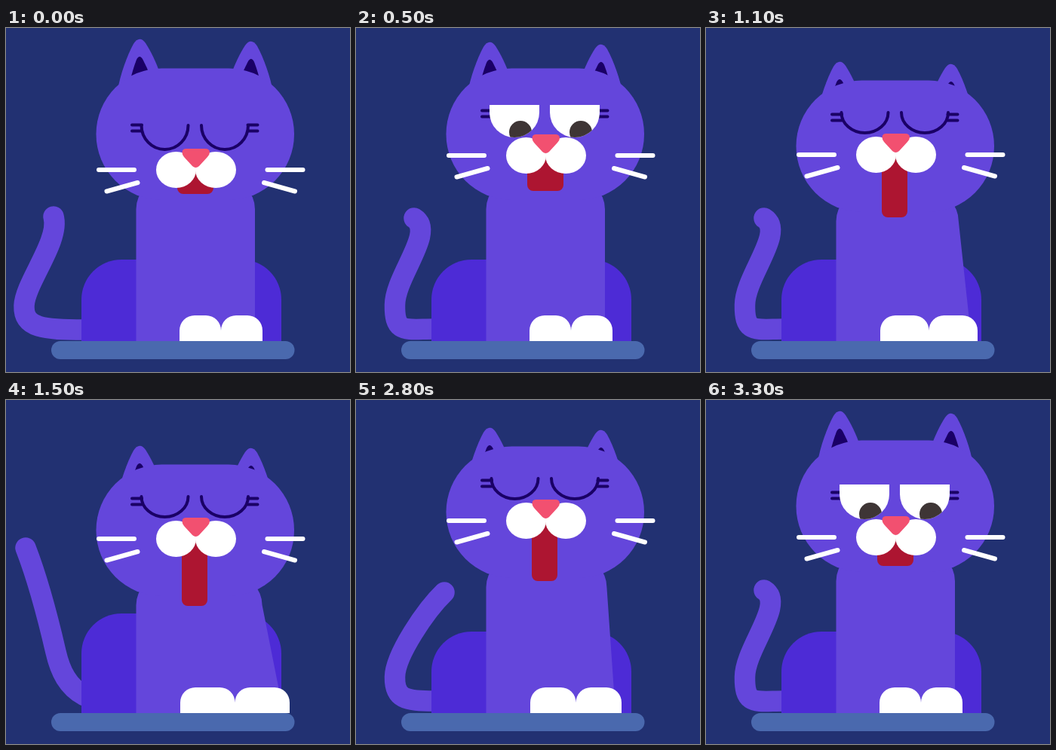
Animation of 456x456 px, one loop 3.4 s. Source, as an HTML page:

```html
<!DOCTYPE html>
<html lang="en">
<head>
<meta charset="utf-8">
<title>Yawning cat</title>
<style>
  html, body { margin: 0; height: 100%; overflow: hidden; background: #223172; }
  svg { display: block; width: 100vw; height: 100vh; }
  .fur { fill: #6446db; }
  .dark { fill: #1a0066; }
  .white { fill: #fff; }
  .line { fill: none; stroke: #1a0066; stroke-width: 4; stroke-linecap: round; }
  .whisker { fill: none; stroke: #fff; stroke-width: 6; stroke-linecap: round; }
  #tail { fill: none; stroke: #6446db; stroke-width: 27.5; stroke-linecap: round; }
</style>
</head>
<body>
<svg viewBox="0 0 456 456">
  <defs>
    <clipPath id="eyeClip"><path id="eyeEdge"/></clipPath>
    <g id="openEye" clip-path="url(#eyeClip)">
      <rect class="white" x="170" y="100" width="80" height="70"/>
      <circle cx="218" cy="157" r="15" fill="#3e3535"/>
    </g>
    <path id="closedEye" class="line"/>
    <path id="lash" class="line" d="M167 128.500H180M167 136.500H180"/>
    <path id="whiskers" class="whisker" d="M123 188H170M133.500 216.500L174.500 205"/>
    <g id="ear">
      <path class="fur" d="M148 82C152 60 160 38 169 21Q177 9 185 20C192 31 199 45 204 60V90H148Z"/>
      <path class="dark" d="M164 72Q168 55 173 42Q177 34 181.500 42Q187 52 191 64Z"/>
    </g>
  </defs>

  <rect width="456" height="456" fill="#223172"/>
  <path id="tail"/>
  <path id="haunch" fill="#4d2bd6"/>
  <path id="chest" class="fur"/>
  <path id="paws" class="white"/>
  <rect x="60" y="415" width="322.500" height="24" rx="12" fill="#4a69ae"/>

  <g id="head">
    <g id="ears">
      <use href="#ear"/>
      <use href="#ear" transform="translate(502 3) scale(-1 1)"/>
    </g>
    <rect class="fur" x="119.500" y="53.500" width="262.500" height="174.500" rx="87"/>
    <g id="face">
      <g id="lashes">
        <use href="#lash"/>
        <use href="#lash" transform="translate(500.500) scale(-1 1)"/>
      </g>
      <g id="open"><use href="#openEye"/><use href="#openEye" x="80"/></g>
      <g id="closed"><use href="#closedEye"/><use href="#closedEye" x="79.500"/></g>
      <rect id="mouth" y="186" rx="8" fill="#ad1531"/>
      <ellipse class="white" cx="225.500" cy="188" rx="26.500" ry="24"/>
      <ellipse class="white" cx="278" cy="188" rx="27" ry="24"/>
      <path fill="#f25070" d="M239 160H264Q270 160 270 165Q270 168 267 171L256 183Q251.500 187 247 183L236 171Q233.500 168 233.500 165Q233.500 160 239 160Z"/>
      <use href="#whiskers"/>
      <use href="#whiskers" transform="translate(516.500) scale(-1 1)"/>
    </g>
  </g>
</svg>
<script>
const LOOP = 3400;
const $ = id => document.getElementById(id);

// Each step holds one moment of the yawn; the way back replays it in reverse.
const steps = [
  ...[0, 100, 200, 300, 400, 500, 600, 700, 800, 900, 1100, 1300, 1500].map(t => [t, t]),
  [2500, 1300], [2700, 1100], [2800, 900], [2900, 800],
  [3000, 700], [3100, 600], [3200, 500], [3300, 400]
];

// moment: head drop, face shift, ear drop, mouth opening, lid height, lid sag, lash drop
const poseKeys = [
  [0,    0, 0, 0, 0, 118, 0, 0],
  [300,  0, 0, 0, 0, 118, 0, 0],
  [400,  0, -6, 0, 6, 118, 0, 0],
  [600,  0, -32, 8, 24, 124, 0, 0],
  [800,  0, -32, 12, 40, 130, 16, 6],
  [900,  8, -36, 14, 48, 130, 16, 6],
  [1500, 32, -36, 14, 57, 130, 16, 6]
];

// Tail curves: tip, two handles, bend, handle, base
const tails = {
  left:  [63, 250, 72, 282, 25, 338, 24, 368, 50, 400, 104, 400],
  curl:  [55.5, 257, 96, 262, 40, 330, 40, 367, 60, 399, 104, 399],
  rest:  [77, 252, 106, 270, 52, 328, 51.5, 367, 65, 399, 104, 399],
  right: [117, 255, 93, 278, 52, 338, 51.5, 367, 65, 399, 104, 399],
  wave:  [46, 218, 84, 268, 58, 325, 57.5, 355, 65, 388, 104, 397],
  high:  [26, 196, 45, 245, 60, 308, 66, 334, 82, 380, 104, 392]
};
const tailKeys = [
  [0, 'left'], [300, 'curl'], [400, 'rest'], [600, 'rest'], [800, 'right'],
  [900, 'right'], [1100, 'rest'], [1300, 'wave'], [1500, 'high']
].map(([t, name]) => [t, ...tails[name]]);

function sample(keys, t) {
  const i = Math.max(1, keys.findIndex(k => k[0] >= t));
  const [a, b] = [keys[i - 1], keys[i]];
  const u = (t - a[0]) / (b[0] - a[0]);
  return a.slice(1).map((v, j) => v + (b[j + 1] - v) * u);
}

const setPath = (id, d) => $(id).setAttribute('d', d);
const shift = (id, y) => $(id).setAttribute('transform', `translate(0 ${y})`);
const show = (id, on) => $(id).setAttribute('display', on ? 'inline' : 'none');

function drawBody(drop) {
  const top = 307 - Math.max(0, (drop - 16) * 1.5);
  setPath('haunch', `M100 415V${top + 53}a53 53 0 0 1 53 -53H312a53 53 0 0 1 53 53V415Z`);

  const lean = drop ? drop + 6 : 0;
  const shoulder = 330 + drop * 0.3;
  setPath('chest', `M172.500 415V${240 + drop}a40 40 0 0 1 40 -40H${shoulder - 40}` +
    `a40 40 0 0 1 40 40L${330 + lean} 415Z`);

  const left = drop ? 231 : 230;
  const right = 340 + (drop ? drop + 4 : 0);
  const paw = (right - left) / 2;
  const pawPath = x => `M${x} 415V401a20 20 0 0 1 20 -20h${paw - 40}a20 20 0 0 1 20 20V415Z`;
  setPath('paws', pawPath(left) + pawPath(left + paw));
}

function drawFace(t, opening, lid, sag, lash) {
  const closed = t < 200 || t >= 900;
  show('open', !closed);
  show('closed', closed);
  setPath('eyeEdge', `M177 ${lid}V131A33 33 0 0 0 243 131V${lid}Q210 ${lid + 2 * sag} 177 ${lid}Z`);
  const end = 129 + lash / 2;
  setPath('closedEye', `M179.500 ${end}A31 ${32 - lash * 5 / 6} 0 0 0 241.500 ${end}`);
  shift('lashes', lash);

  const width = t >= 900 ? 34 : 48;
  $('mouth').setAttribute('x', (t >= 900 ? 250 : 251) - width / 2);
  $('mouth').setAttribute('width', width);
  $('mouth').setAttribute('height', 34 + opening);
}

function draw(t) {
  const [drop, face, ear, opening, lid, sag, lash] = sample(poseKeys, t);
  shift('head', drop);
  shift('face', face);
  shift('ears', ear);
  drawBody(drop);
  drawFace(t, opening, lid, sag, lash);
  const p = sample(tailKeys, t);
  setPath('tail', `M${p.slice(0, 2)}C${p.slice(2, 8)}S${p.slice(8)}`);
}

const start = performance.now();
function tick() {
  const now = (performance.now() - start) % LOOP;
  draw(steps.findLast(([from]) => from <= now)[1]);
  requestAnimationFrame(tick);
}
tick();
</script>
</body>
</html>
```
